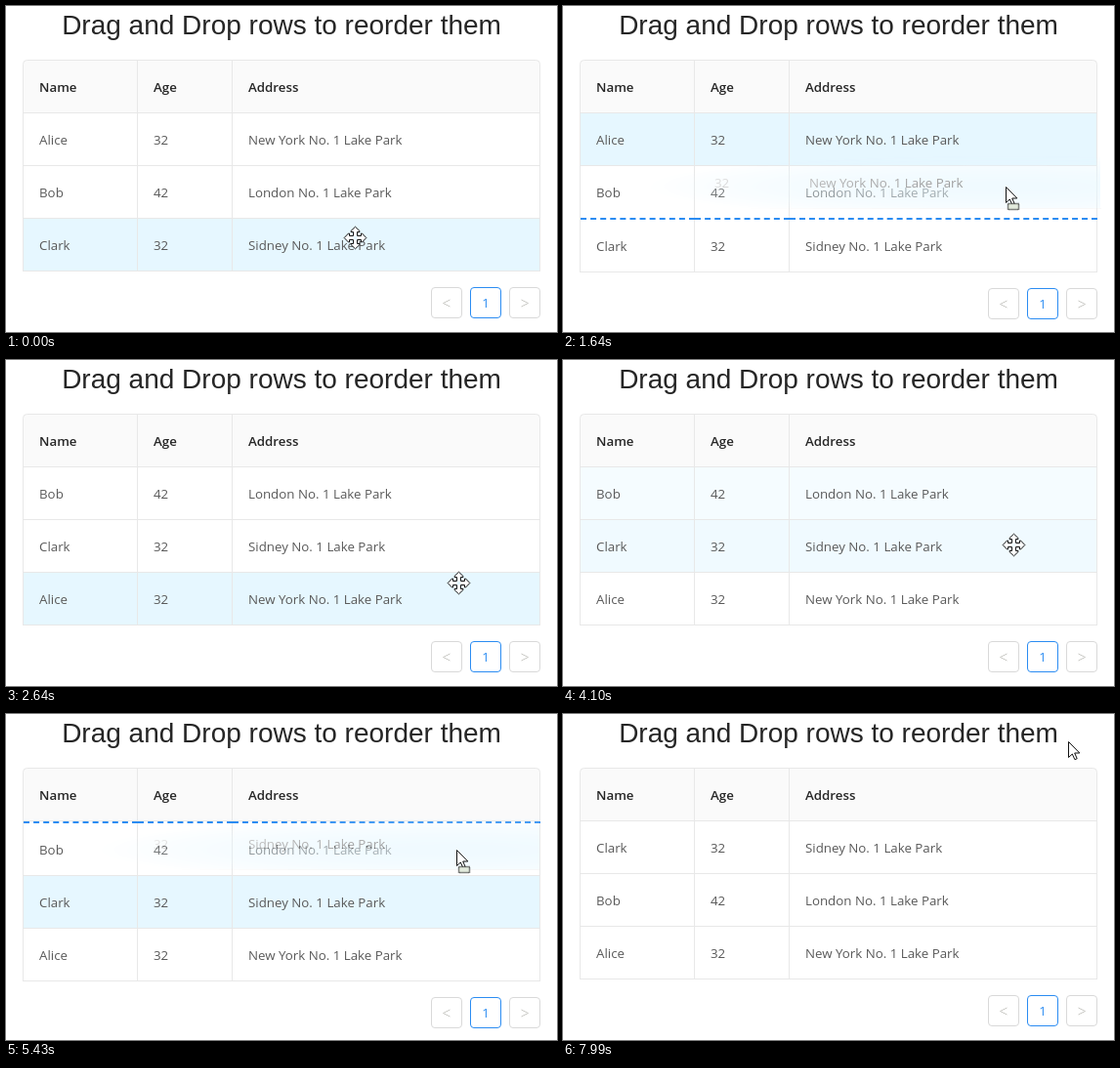
Write an HTML page that moves like this. It is 564 px wide and 334 px high and loops after 8.23 s.

```html
<!DOCTYPE html>
<html lang="en">
<head>
<meta charset="utf-8">
<title>Row reordering</title>
<style>
  html, body { margin: 0; width: 100%; height: 100%; overflow: hidden; background: #fff; }
  svg { display: block; width: 564px; height: 334px; }
  text { font: 13.3px "Open Sans", "Noto Sans", sans-serif; fill: #595959; }
  .title { font: 28px "Liberation Sans", Arial, sans-serif; fill: #262626; text-anchor: middle; }
  .head { font-weight: 600; fill: #262626; }
  .line { fill: none; stroke: #e8e8e8; }
  .button { fill: #fff; stroke: #d9d9d9; }
  .chevron { fill: none; stroke: #cacac6; }
  .active { stroke: #2b8cf2; }
  .page { fill: #2b8cf2; text-anchor: middle; }
  .drop { fill: none; stroke: #2b8cf2; stroke-width: 2; }
  .cursor { fill: #fff; stroke: #111; }
</style>
</head>
<body>
<svg id="stage" xmlns="http://www.w3.org/2000/svg"></svg>
<script>
const LOOP = 8230, TICKS = 100, TICK = LOOP / TICKS;
const FADE = 300 / TICK;
const TOP = 110, ROW = 54;
const COLUMNS = [18, 135, 232, 547];
const PEOPLE = {
  Alice: ['32', 'New York No. 1 Lake Park'],
  Bob: ['42', 'London No. 1 Lake Park'],
  Clark: ['32', 'Sidney No. 1 Lake Park']
};
// The pointer is sampled once per tick; each move is first tick, last tick, x, y.
const START = [357, 237];
const MOVES = [
  [0, 7, 449, 141], [14, 20, 453, 185], [20, 26, 463, 228],
  [38, 41, 482, 170], [41, 42, 473, 142], [45, 48, 466, 158],
  [48, 50, 461, 189], [50, 52, 461, 197], [58, 66, 461, 139],
  [81, 82, 461, 130], [82, 89, 507, 33], [93, 97, 517, 28]
];
const isPressed = k => (k >= 15 && k < 29) || (k >= 59 && k < 72);

function pointerAt(k) {
  let [x, y] = START;
  for (const [from, to, toX, toY] of MOVES) {
    const p = Math.max(0, Math.min(1, (k - from) / (to - from)));
    x += (toX - x) * p;
    y += (toY - y) * p;
  }
  return { x: Math.round(x), y: Math.round(y) };
}

// Play the pointer through once: row order, drags and highlights follow from it.
const states = [], drags = [], lights = {};
function levelAt(name, u) {
  const { at, from, goal } = lights[name].filter(c => c.at <= u).pop();
  const rest = 1 - Math.min(1, (u - at) / FADE);
  return goal + (from - goal) * rest * rest;
}
function simulate() {
  let order = Object.keys(PEOPLE), drag = null, lit = 'Clark', last = null;
  for (const name of order) {
    const level = Number(name === lit);
    lights[name] = [{ at: 0, from: level, goal: level }];
  }
  for (let k = 0; k < TICKS; k++) {
    const { x, y } = pointerAt(k);
    const over = Math.floor((y - TOP) / ROW);
    if (isPressed(k) && !drag) {
      drag = { name: last.order[last.over], row: last.over, x: last.x, y: last.y };
      drags.push(drag);
    } else if (!isPressed(k) && drag) {
      const { name, row } = drag;
      order = order.filter(n => n !== name);
      order.splice(over, 0, name);
      // A row dropped further down is inserted anew and lights up again.
      if (over > row) lights[name].push({ at: k, from: 0, goal: 1 });
      drag = null;
    }
    const next = drag ? drag.name : order[over];
    if (next !== lit) {
      if (lit) lights[lit].push({ at: k, from: levelAt(lit, k), goal: 0 });
      if (next) lights[next].push({ at: k, from: levelAt(next, k), goal: 1 });
      lit = next;
    }
    last = { x, y, over, order, drag };
    states.push(last);
  }
}

const stage = document.getElementById('stage');
function set(el, attrs) {
  for (const key in attrs) el.setAttribute(key, attrs[key]);
}
function add(parent, tag, attrs = {}, text = '') {
  const el = document.createElementNS('http://www.w3.org/2000/svg', tag);
  set(el, attrs);
  if (text) el.textContent = text;
  parent.append(el);
  return el;
}
function show(el, on) {
  el.style.display = on ? '' : 'none';
}
const move = (el, x, y) => el.setAttribute('transform', `translate(${x} ${y})`);

function addTexts(parent, words, y, type = '') {
  words.forEach((s, i) => add(parent, 'text', { x: COLUMNS[i] + 16, y, class: type }, s));
}
function makeRow(name) {
  const g = add(stage, 'g');
  const tint = add(g, 'rect', { x: 18, width: 528, height: ROW, fill: '#e6f7ff' });
  const rule = add(g, 'path', { d: 'M17 53.5H547', class: 'line' });
  addTexts(g, [name, ...PEOPLE[name]], 32);
  return { g, tint, rule };
}
// The dragged copy fades out in a flat ellipse around the grip point.
function makeGhost(drag, i) {
  const defs = add(stage, 'defs');
  const gripY = drag.y - TOP - drag.row * ROW;
  const glow = add(defs, 'radialGradient', {
    id: 'glow' + i, gradientUnits: 'userSpaceOnUse', cx: 0, cy: 0, r: 1,
    gradientTransform: `translate(${drag.x} ${gripY}) scale(370 33)`
  });
  for (let s = 0; s <= 1; s += 0.125)
    add(glow, 'stop', { offset: s, 'stop-color': '#fff', 'stop-opacity': 0.6 * (1 - s * s) });
  const area = { x: 17, y: 0, width: 530, height: ROW };
  const mask = add(defs, 'mask', { id: 'fade' + i, maskUnits: 'userSpaceOnUse', ...area });
  add(mask, 'rect', { ...area, fill: `url(#glow${i})` });
  const { g } = makeRow(drag.name);
  g.setAttribute('mask', `url(#fade${i})`);
  return g;
}
// Dashes run separately in each cell, starting and ending on a full dash.
function makeDrop() {
  const g = add(stage, 'g', { class: 'drop' });
  for (let i = 0; i < 3; i++) {
    const length = COLUMNS[i + 1] - COLUMNS[i];
    const count = Math.round((length + 4) / 10);
    const gap = (length - count * 6) / (count - 1);
    add(g, 'path', { d: `M${COLUMNS[i]} 1h${length}`, 'stroke-dasharray': `6 ${gap}` });
  }
  return g;
}
function makePager() {
  const g = add(stage, 'g');
  for (let i = 0; i < 3; i++)
    add(g, 'rect', {
      x: 435.5 + 40 * i, y: 288.5, width: 31, height: 31, rx: 3.5,
      class: i === 1 ? 'button active' : 'button'
    });
  add(g, 'path', { d: 'M454.5 301l-7 3.5 7 3.5M527.5 301l7 3.5-7 3.5', class: 'chevron' });
  add(g, 'text', { x: 491, y: 309, class: 'page' }, '1');
  return g;
}
function makeCursors() {
  const kinds = {};
  for (const kind of ['move', 'arrow', 'drag', 'beam']) kinds[kind] = add(stage, 'g', { class: 'cursor' });
  const arm = 'M-2 -2V-6H-4.5V-7L0 -11.3L4.5 -7V-6H2V-2';
  for (let turn = 0; turn < 360; turn += 90)
    add(kinds.move, 'path', { d: arm, transform: `translate(.5 .5) rotate(${turn})` });
  const arrow = 'M.5 .5V16.5L4.3 13L6.9 18.7L9.2 17.7L6.7 12H11.8Z';
  add(kinds.arrow, 'path', { d: arrow });
  add(kinds.drag, 'path', { d: arrow });
  add(kinds.drag, 'rect', {
    x: 2.5, y: 17.5, width: 11, height: 6, fill: '#e3ebdd', 'stroke-width': 1.5, 'stroke-dasharray': '1 1'
  });
  add(kinds.beam, 'path', { d: 'M-3 -7.5H0M1 -7.5H4M.5 -7V7M-3 7.5H0M1 7.5H4', fill: 'none' });
  return kinds;
}

simulate();
add(stage, 'text', { x: 282, y: 29, class: 'title' }, 'Drag and Drop rows to reorder them');
const outline = bottom => `M17.5 ${bottom}V59.5a4 4 0 0 1 4-4H542.5a4 4 0 0 1 4 4V${bottom}`;
add(stage, 'path', { d: outline(109), fill: '#fafafa' });
addTexts(stage, ['Name', 'Age', 'Address'], 88, 'head');
const rows = {};
for (const name in PEOPLE) rows[name] = makeRow(name);
const frame = add(stage, 'path', { class: 'line' });
const drop = makeDrop();
const pager = makePager();
const ghosts = drags.map(makeGhost);
const cursors = makeCursors();

function render(t) {
  const u = t / TICK + 0.45;
  const { x, y, over, order, drag } = states[Math.min(TICKS - 1, Math.floor(u))];
  const side = drag ? Math.sign(over - drag.row) : 0;

  let top = TOP;
  order.forEach((name, i) => {
    const { g, tint, rule } = rows[name];
    const above = side < 0 && i === over, below = side > 0 && i === over;
    if (above || below) move(drop, 0, below ? top + ROW - 1 : top);
    if (above) top += 2;
    move(g, 0, top);
    tint.setAttribute('opacity', levelAt(name, u));
    show(rule, !below);
    top += below ? ROW + 1 : ROW;
  });
  show(drop, side !== 0);
  frame.setAttribute('d', `${outline(top)}M134.5 56V${top}M231.5 56V${top}M18 109.5H546`);
  move(pager, 0, top - TOP - 3 * ROW);

  ghosts.forEach((ghost, i) => {
    const d = drags[i];
    show(ghost, d === drag);
    move(ghost, x - d.x, TOP + d.row * ROW + y - d.y);
  });

  const kind = drag ? 'drag' : y < 47 && x < 511 ? 'beam' : y < TOP ? 'arrow' : 'move';
  for (const name in cursors) show(cursors[name], name === kind);
  move(cursors[kind], x, y);
}

const begin = performance.now();
function tick() {
  render((performance.now() - begin) % LOOP);
  requestAnimationFrame(tick);
}
tick();
</script>
</body>
</html>
```
